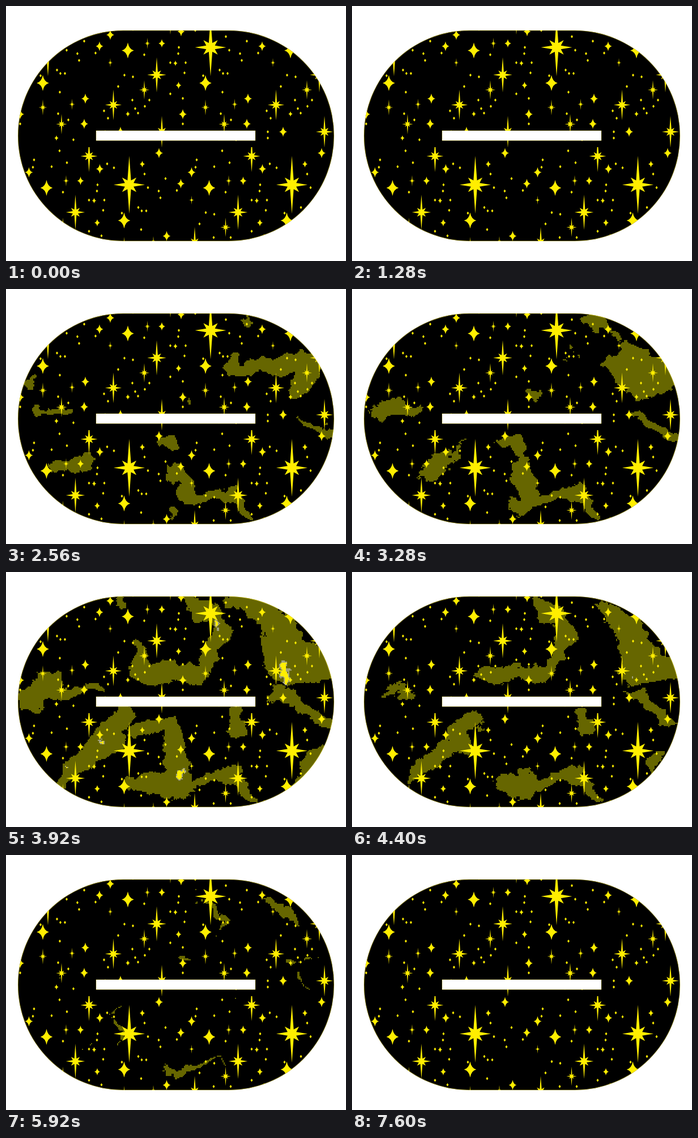
Write an HTML page with a canvas that moves like this. It is 600 px wide and 450 px high and loops after 7680 ms.

```html
<!DOCTYPE html>
<html>
<head>
<meta charset="utf-8">
<style>
html, body { margin: 0; width: 100%; height: 100%; overflow: hidden; background: #fff; }
canvas { display: block; }
</style>
</head>
<body>
<canvas id="stage" width="600" height="450"></canvas>
<script>
const LOOP = 7680, STEP = 80;
const TILE_W = 287, TILE_H = 242.5, TILE_TOP = 6.5;
const W = 300, H = 225; // cloud grid, one cell per 2 x 2 pixels
const YELLOW = '#ffee00';
const ctx = document.getElementById('stage').getContext('2d');

// Stars of one tile: x, y, half height
const bursts = [
  [361, 73, 51], [266, 121.5, 31], [189.5, 174.5, 27], [244, 148, 17], [290, 22.5, 28],
  [275, 222, 28], [385, 208.5, 18], [352, 179, 14], [403.5, 173.5, 10], [249.5, 66, 10], [184, 100, 8]
];
const sparks = [
  [215, 78.5, 14], [352, 136, 14], [165, 71, 8.5], [184, 51, 9], [275, 66, 7.5], [309, 45, 8.5],
  [304.5, 140, 6.5], [140, 163.5, 9], [312, 191, 9], [138, 208, 9], [202, 222, 9], [126.5, 17, 9],
  [384, 36.5, 6], [299, 101, 5], [215, 190.5, 5], [89, 233, 5]
];
const dots = [
  388, 54, 244, 86, 394, 78, 413, 84, 305, 73, 317, 100, 391, 119, 233, 189,
  379, 190, 312, 208, 198, 142, 158, 83, 304, 84, 290, 100, 315, 118, 348, 123,
  383, 119, 209, 122, 224, 125, 290, 155, 312, 163, 382, 152, 377, 113, 416, 96,
  223, 166, 253, 166, 228, 181, 245, 177, 180, 198, 173, 185, 397, 201, 119, 236,
  175, 222, 175, 233, 238, 13, 251, 34, 193, 29, 191, 42, 224, 41, 322, 36,
  334, 43, 425, 62
];

// Cloud strokes: chains of x, y, radius
const early = [
  [404, 115, 8, 400, 147, 11, 440, 135, 15, 540, 128, 24, 512, 175, 17],
  [428, 60, 9], [42, 160, 9], [50, 207, 6, 110, 210, 5], [320, 195, 7], [282, 268, 15],
  [80, 312, 6, 136, 302, 15], [290, 392, 8],
  [297, 322, 13, 325, 368, 14, 400, 360, 8, 436, 405, 4], [510, 228, 3, 570, 250, 8]
];
const peak = [
  [320, 46, 13, 386, 95, 15, 345, 180, 16, 240, 176, 17, 234, 132, 11],
  [395, 54, 13, 440, 58, 17, 482, 90, 27, 495, 150, 47, 545, 165, 36],
  [205, 52, 9], [72, 188, 22, 40, 230, 16], [90, 212, 12, 172, 204, 3],
  [210, 245, 14, 182, 290, 28, 95, 365, 12],
  [230, 275, 12, 285, 265, 16, 300, 340, 17, 308, 378, 24, 215, 370, 12],
  [340, 365, 13, 400, 355, 9, 442, 402, 7], [405, 245, 14, 405, 275, 12],
  [480, 215, 16, 570, 265, 10], [548, 318, 13, 505, 380, 9]
];
const late = [
  [325, 52, 8, 386, 115, 16, 378, 145, 8], [460, 75, 12, 490, 95, 23, 515, 127, 12],
  [212, 182, 5, 268, 185, 5], [305, 182, 14, 350, 175, 9], [490, 185, 15, 562, 184, 8],
  [515, 215, 13, 550, 240, 9, 550, 272, 7], [90, 212, 10],
  [245, 240, 6, 185, 280, 11, 205, 310, 17, 184, 362, 4], [150, 325, 11, 108, 358, 6],
  [385, 243, 5, 420, 265, 11], [530, 325, 10],
  [270, 375, 12, 302, 385, 19, 380, 351, 10, 446, 402, 4]
];
const cores = [[483, 165, 10, 488, 188, 10], [165, 298, 6], [308, 355, 8], [372, 92, 5], [110, 345, 5]];

function hash(x, y) {
  let n = Math.imul(x, 374761393) + Math.imul(y, 668265263);
  n = Math.imul(n ^ (n >>> 13), 1274126177);
  return ((n ^ (n >>> 16)) >>> 0) / 2147483648 - 1;
}

function noise(x, y) {
  const i = Math.floor(x), j = Math.floor(y);
  const ease = v => v * v * (3 - 2 * v);
  const u = ease(x - i), v = ease(y - j);
  const top = hash(i, j) * (1 - u) + hash(i + 1, j) * u;
  const low = hash(i, j + 1) * (1 - u) + hash(i + 1, j + 1) * u;
  return top * (1 - v) + low * v;
}

function fbm(x, y) {
  let sum = 0;
  for (let k = 0, amp = 1; k < 4; k++, amp *= 0.55, x *= 2.1, y *= 2.1) sum += amp * noise(x, y);
  return sum;
}

// Ragged sample position and edge offset for each cell
const warp = Array.from({ length: W * H }, (_, i) => {
  const x = i % W * 2, y = Math.floor(i / W) * 2;
  return [x + 8 * fbm(x / 28, y / 28), y + 8 * fbm(x / 28 + 90, y / 28 + 40), 2.5 * fbm(x / 9 + 7, y / 9 + 300)];
});

// Distance inside the strokes; negative outside
function field(strokes) {
  const segments = [];
  for (const s of strokes)
    for (let i = 0; i < Math.max(3, s.length - 3); i += 3) {
      const [x, y, r, x2 = x, y2 = y, r2 = r] = s.slice(i, i + 6);
      const dx = x2 - x, dy = y2 - y;
      segments.push([x, y, r, dx, dy, r2 - r, dx * dx + dy * dy || 1]);
    }
  return Float32Array.from(warp, ([px, py, edge]) => {
    let best = -25;
    for (const [x, y, r, dx, dy, dr, len] of segments) {
      const ax = px - x, ay = py - y;
      const k = Math.max(0, Math.min(1, (ax * dx + ay * dy) / len));
      const ex = ax - k * dx, ey = ay - k * dy;
      best = Math.max(best, r + k * dr - Math.sqrt(ex * ex + ey * ey));
    }
    return best + edge;
  });
}

const first = field(early), last = field(late), glow = field(cores);
const keys = [
  [1500, first.map(v => v - 30)], [2560, first], [3920, field(peak)],
  [4960, last], [5920, last.map(v => v - 10)], [6800, last.map(v => v - 28)]
];

const sky = document.createElement('canvas');
sky.width = W;
sky.height = H;
const skyCtx = sky.getContext('2d');
const image = skyCtx.createImageData(W, H);
const pixels = new Uint32Array(image.data.buffer);
const BLACK = 0xff000000, OLIVE = 0xff006666, GREY = 0xff78a0a0, BRIGHT = 0xff00eeff;

function paintClouds(t) {
  const n = keys.findIndex(k => k[0] > t);
  if (n < 1) {
    pixels.fill(BLACK);
  } else {
    const [t0, a] = keys[n - 1], [t1, b] = keys[n];
    const mix = (t - t0) / (t1 - t0), fade = Math.abs(t - 3920) / 55;
    for (let i = 0; i < pixels.length; i++) {
      const core = glow[i] - fade;
      pixels[i] = a[i] + (b[i] - a[i]) * mix < 0 ? BLACK : core > 3 ? BRIGHT : core > 0.8 ? GREY : OLIVE;
    }
  }
  skyCtx.putImageData(image, 0, 0);
}

function addBurst(path, x, y, v) {
  const h = v * 0.54;
  for (let k = 0; k < 16; k++) {
    const a = k * Math.PI / 8;
    const r = k % 2 ? h * 0.3 : k % 4 ? h * 0.65 : k % 8 ? v : h;
    path[k ? 'lineTo' : 'moveTo'](x + r * Math.cos(a), y + r * Math.sin(a));
  }
  path.closePath();
}

function addSpark(path, x, y, v) {
  const h = v * 0.77, c = h * 0.2;
  path.moveTo(x, y - v);
  path.quadraticCurveTo(x + c, y - c, x + h, y);
  path.quadraticCurveTo(x + c, y + c, x, y + v);
  path.quadraticCurveTo(x - c, y + c, x - h, y);
  path.quadraticCurveTo(x - c, y - c, x, y - v);
}

function addDot(path, x, y) {
  path.moveTo(x, y - 2.7);
  path.lineTo(x + 2, y);
  path.lineTo(x, y + 2.7);
  path.lineTo(x - 2, y);
  path.closePath();
}

const starRows = [0, 1].map(row => {
  const path = new Path2D();
  for (let k = -2; k <= 2; k++) {
    const dx = (k + row / 2) * TILE_W, dy = row * TILE_H;
    for (const [x, y, v] of bursts) addBurst(path, x + dx, y + dy, v);
    for (const [x, y, v] of sparks) addSpark(path, x + dx, y + dy, v);
    for (let i = 0; i < dots.length; i += 2) addDot(path, dots[i] + dx, dots[i + 1] + dy);
  }
  return path;
});

const badge = new Path2D();
badge.roundRect(21, 43, 558, 372, 186);

function draw(now) {
  const t = Math.floor(now % LOOP / STEP) * STEP;
  ctx.fillStyle = '#fff';
  ctx.fillRect(0, 0, 600, 450);
  ctx.save();
  ctx.clip(badge);
  paintClouds(t);
  ctx.imageSmoothingEnabled = false;
  ctx.drawImage(sky, 0, 0, 600, 450);
  ctx.fillStyle = YELLOW;
  starRows.forEach((path, row) => {
    ctx.save();
    ctx.beginPath();
    ctx.rect(0, TILE_TOP + row * TILE_H, 600, TILE_H);
    ctx.clip();
    ctx.fill(path);
    ctx.restore();
  });
  ctx.strokeStyle = 'rgba(255, 238, 0, 0.5)';
  ctx.lineWidth = 1.5;
  ctx.stroke(badge);
  ctx.restore();
  ctx.fillStyle = '#fff';
  ctx.fillRect(159, 220, 281, 17.5);
  ctx.strokeStyle = 'rgba(255, 238, 0, 0.5)';
  ctx.lineWidth = 0.6;
  ctx.strokeRect(159, 220, 281, 17.5);
}

const start = performance.now();
function tick() {
  draw(performance.now() - start);
  requestAnimationFrame(tick);
}
tick();
</script>
</body>
</html>
```
